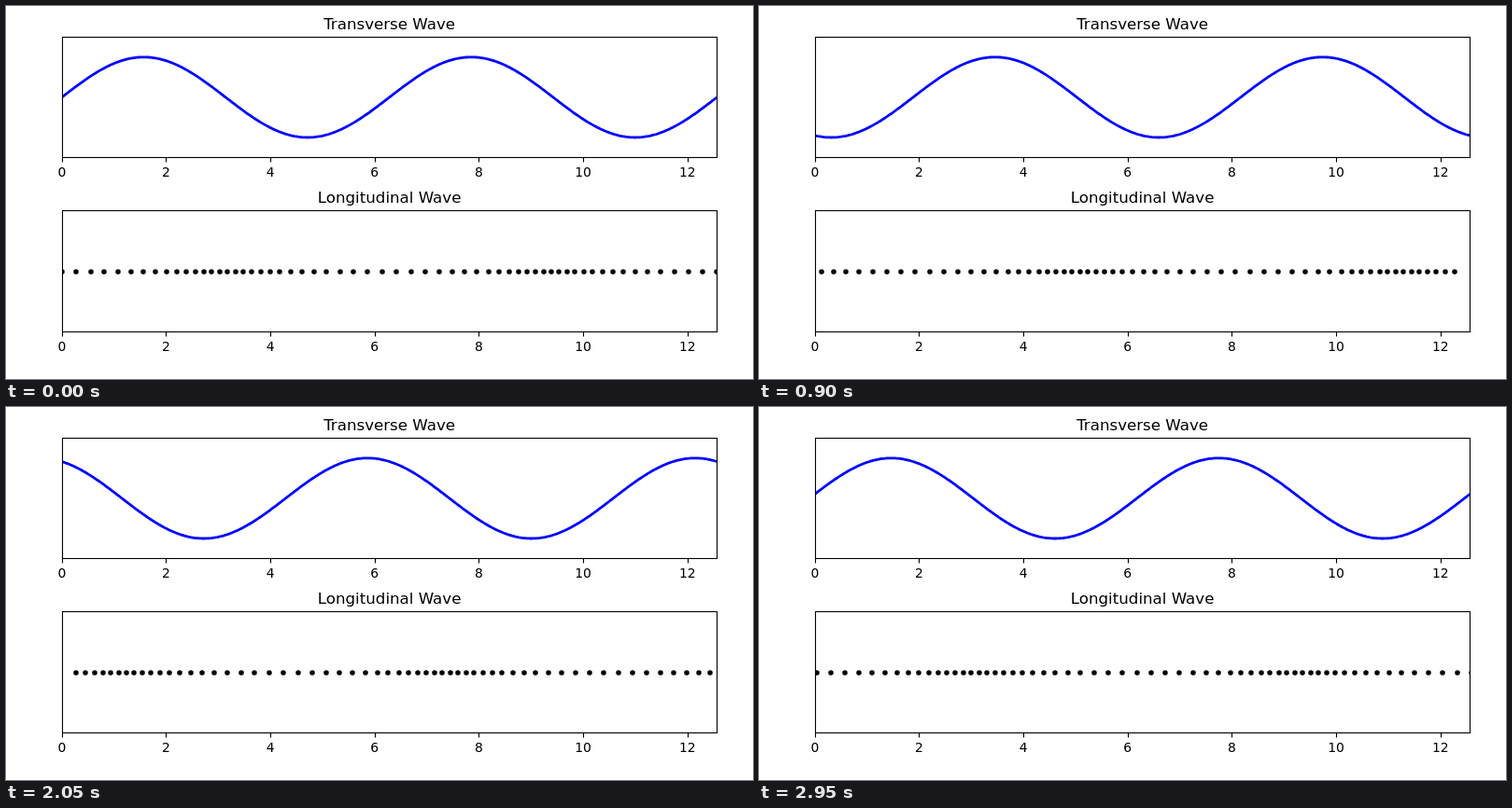
Write an HTML page that moves like this. It is 800 px wide and 400 px high and loops after 3000 ms.

```html
<!DOCTYPE html>
<html lang="en">
<head>
<meta charset="utf-8">
<title>Transverse and longitudinal waves</title>
<style>
html, body { margin: 0; width: 100%; height: 100%; overflow: hidden; background: #fff; }
svg { display: block; }
text { font: 13.89px "DejaVu Sans", sans-serif; text-anchor: middle; }
.title { font-size: 16.67px; }
.axes { fill: none; stroke: #000; stroke-width: 1.11; }
#wave { fill: none; stroke: #00f; stroke-width: 2.78; stroke-linejoin: round; }
</style>
</head>
<body>
<svg width="800" height="400" viewBox="0 0 800 400">
  <clipPath id="clip"><rect x="60" y="33" width="702" height="317"/></clipPath>
  <g clip-path="url(#clip)">
    <path id="wave"/>
    <g id="dots"></g>
  </g>
  <g id="frame"></g>
</svg>
<script>
const LOOP = 3000, STEPS = 60, DOTS = 60, SPAN = 4 * Math.PI;
const X0 = 59.8, UNIT = 55.83, MID = 97.9, AMP = 43.1, DOT_Y = 285;
const wave = document.getElementById('wave');
const dotGroup = document.getElementById('dots');
const toX = x => X0 + x * UNIT;

function add(parent, tag, attrs, text = '') {
  const el = document.createElementNS('http://www.w3.org/2000/svg', tag);
  for (const key in attrs) el.setAttribute(key, attrs[key]);
  el.textContent = text;
  return parent.appendChild(el);
}

function addAxes(title, top, bottom) {
  const frame = document.getElementById('frame');
  add(frame, 'rect', { class: 'axes', x: 60.5, y: top, width: 701, height: bottom - top });
  add(frame, 'text', { class: 'title', x: 410.6, y: top - 8.5 }, title);
  for (let n = 0; n <= 12; n += 2) {
    const x = toX(n);
    add(frame, 'path', { class: 'axes', d: `M${Math.round(x) + 0.5} ${bottom}v5` });
    add(frame, 'text', { x, y: bottom + 20.5 }, n);
  }
}

addAxes('Transverse Wave', 33.5, 162.5);
addAxes('Longitudinal Wave', 219.5, 349.5);
const dots = Array.from({ length: DOTS }, () => add(dotGroup, 'circle', { cy: DOT_Y, r: 2.78 }));

function draw(phase) {
  let d = '';
  for (let i = 0; i <= 400; i++) {
    const x = SPAN * i / 400;
    d += `${i ? 'L' : 'M'}${toX(x).toFixed(2)} ${(MID - AMP * Math.sin(x - phase)).toFixed(2)}`;
  }
  wave.setAttribute('d', d);
  dots.forEach((dot, i) => {
    const x = SPAN * i / (DOTS - 1);
    // dots sit on whole pixels
    dot.setAttribute('cx', Math.round(toX(x + 0.3 * Math.sin(x - phase))));
  });
}

function tick() {
  const step = Math.floor(performance.now() % LOOP / LOOP * STEPS);
  draw(2 * Math.PI * step / STEPS);
  requestAnimationFrame(tick);
}
tick();
</script>
</body>
</html>
```
